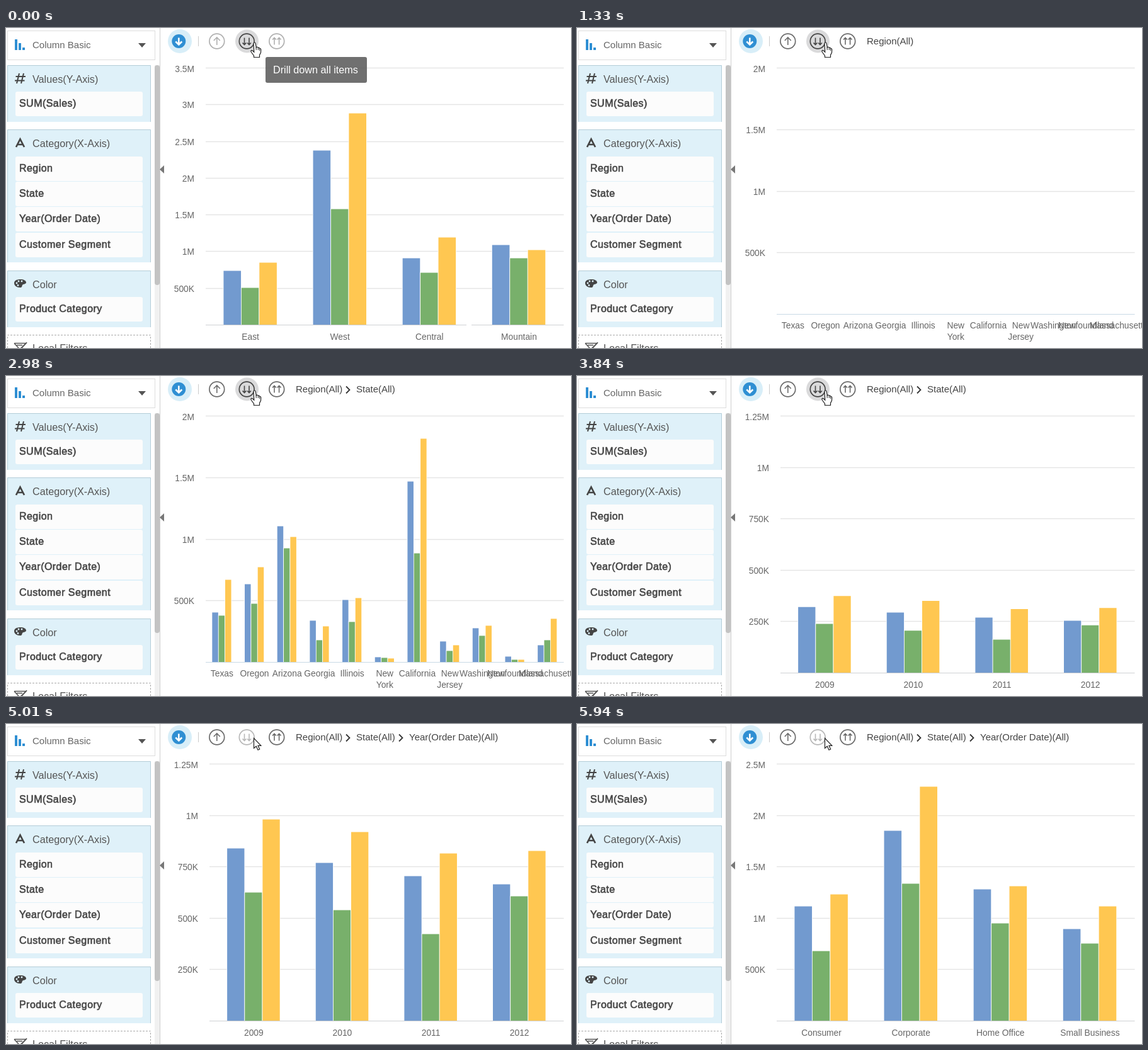
These frames come from a looping animation (897 px wide and 508 px high, 6.41 s). An HTML page with a canvas:

```html
<!DOCTYPE html>
<html lang="en">
<head>
<meta charset="utf-8">
<title>Drill down chart</title>
<style>
html, body { margin: 0; width: 100%; height: 100%; overflow: hidden; background: #fff; }
canvas { display: block; }
</style>
</head>
<body>
<canvas id="stage" width="897" height="508"></canvas>
<script>
const ctx = document.getElementById('stage').getContext('2d');
const LOOP = 6410;
const GROW = 500;
const FONT = '"Liberation Sans", Arial, sans-serif';
const COLORS = ['#729acf', '#78b06b', '#ffc751'];

// Bar tops are in stage pixels, three per category.
const charts = [
  {
    at: 0, left: 317, base: 471, axis: '#cfd1d4',
    ticks: ['3.5M', '3M', '2.5M', '2M', '1.5M', '1M', '500K'],
    names: ['East', 'West', 'Central', 'Mountain'],
    tops: [385, 412, 372, 194, 287, 135, 365, 388, 332, 344, 365, 352]
  },
  {
    at: 1330, end: 1890, steps: 8, begin: 1330, left: 317, base: 454, axis: '#c9d9e6',
    ticks: ['2M', '1.5M', '1M', '500K'],
    names: ['Texas', 'Oregon', 'Arizona', 'Georgia', 'Illinois', 'New|York', 'California',
      'New|Jersey', 'Washington', 'Newfoundland', 'Massachusetts'],
    tops: [375, 380, 323, 330, 361, 303, 238, 273, 255, 388, 419, 397, 355, 390, 352,
      446, 447, 448, 167, 281, 99, 421, 436, 427, 400, 412, 396, 445, 450, 450, 427, 419, 385]
  },
  {
    at: 3680, end: 4150, steps: 7, begin: 3625, left: 323, base: 471, axis: '#cfd1d4',
    ticks: ['1.25M', '1M', '750K', '500K', '250K'],
    names: ['2009', '2010', '2011', '2012'],
    tops: [197, 267, 151, 220, 295, 171, 241, 333, 205, 254, 273, 201]
  },
  {
    at: 5390, end: 5940, steps: 8, begin: 5379, left: 317, base: 471, axis: '#cfd1d4',
    ticks: ['2.5M', '2M', '1.5M', '1M', '500K'],
    names: ['Consumer', 'Corporate', 'Home Office', 'Small Business'],
    tops: [289, 360, 270, 169, 253, 99, 262, 316, 257, 325, 348, 289]
  }
];

function text(str, x, y, size, color, align = 'left') {
  ctx.font = `${size}px ${FONT}`;
  ctx.fillStyle = color;
  ctx.textAlign = align;
  ctx.fillText(str, x, y);
}

// Medium weight: regular letters with a thin outline.
function mediumText(str, x, y) {
  ctx.letterSpacing = '0.45px';
  text(str, x, y, 16, '#444');
  ctx.strokeStyle = '#444';
  ctx.lineWidth = 0.6;
  ctx.strokeText(str, x, y);
  ctx.letterSpacing = '0px';
}

function rect(x, y, w, h, color, r = 0) {
  ctx.fillStyle = color;
  ctx.beginPath();
  ctx.roundRect(x, y, w, h, r);
  ctx.fill();
}

function disc(x, y, r, color) {
  ctx.fillStyle = color;
  ctx.beginPath();
  ctx.arc(x, y, r, 0, Math.PI * 2);
  ctx.fill();
}

function stroke(path, color, width = 1) {
  ctx.strokeStyle = color;
  ctx.lineWidth = width;
  ctx.stroke(new Path2D(path));
}

function fill(path, color) {
  ctx.fillStyle = color;
  ctx.fill(new Path2D(path), 'evenodd');
}

// Holds the time at the start of the current step.
function hold(t, start, end, steps) {
  const d = (end - start) / (steps - 1);
  const k = Math.floor((t - start + 6) / d);
  return start + Math.max(0, Math.min(steps - 1, k)) * d;
}

function swing(p) {
  return 0.5 - Math.cos(Math.PI * Math.max(0, Math.min(1, p))) / 2;
}

function section(y, h, title, first, items) {
  rect(2, y, 228, h, '#dff1f9');
  stroke(`M2.5 ${y + h}V${y + 0.5}H229.5V${y + h}`, '#b3cdd8');
  text(title, 42, y + 28, 16.2, '#555');
  items.forEach((item, i) => {
    const top = Math.round(first + i * 40.2);
    rect(15, top, 202, 39, '#fcfcfc', 3);
    mediumText(item, 21, top + 24);
  });
}

function panel() {
  ctx.strokeStyle = '#dcdcdc';
  ctx.lineWidth = 1;
  ctx.strokeRect(2.5, 4.5, 234, 46);
  rect(14, 18, 4, 17, '#2f8fd3');
  rect(20, 24, 4, 11, '#2f8fd3');
  rect(26, 31, 4, 4, '#2f8fd3');
  text('Column Basic', 42, 32, 15, '#666');
  fill('M210 24H222L216 31Z', '#555');

  section(59, 90, 'Values(Y-Axis)', 101, ['SUM(Sales)']);
  section(161, 211, 'Category(X-Axis)', 204, ['Region', 'State', 'Year(Order Date)', 'Customer Segment']);
  section(385, 90, 'Color', 427, ['Product Category']);

  stroke('M21 72L17 88M28 72L24 88M15.5 77H31M14 83.5H29.5', '#444', 2);
  stroke('M16 189L22.5 176.5L29 189M18.5 185H26.5', '#444', 2.7);
  fill('M13 405C13 401 17 399 23 399C28 399 32 401 32 404C32 407 27 406 26 408C25 410 26 412 22 412C17 412 13 409 13 405Z', '#444');
  [[17, 405], [20, 402], [25, 402], [19, 408.5]].forEach(p => disc(p[0], p[1], 1.4, '#dff1f9'));

  ctx.setLineDash([3, 2]);
  stroke('M2.5 508V487.5H229.5V508', '#aaa');
  ctx.setLineDash([]);
  stroke('M13 500.5H32L25 508M13 500.5L20 508M17 503.5H26M33 499L23 509', '#555', 1.5);
  text('Local Filters', 42, 514, 16.2, '#555');

  stroke('M244.5 0V508', '#cfcfcf');
  rect(236, 59, 8, 449, '#f1f1f1');
  rect(236, 59, 8, 349, '#c3c3c3', 4);
  fill('M251 218V231L244 224.5Z', '#777');
}

function arrow(x, dir, len, head) {
  const tip = 21 + dir * len;
  const back = tip - dir * head;
  return `M${x} ${21 - dir * len}V${tip}M${x - head} ${back}L${x} ${tip}L${x + head} ${back}`;
}

function ring(x, arrows, color) {
  ctx.strokeStyle = color;
  ctx.lineWidth = 1.7;
  ctx.beginPath();
  ctx.arc(x, 21, 11.9, 0, Math.PI * 2);
  ctx.stroke();
  stroke(arrows, color, 1.6);
}

function toolbar(t) {
  disc(276, 21, 19, '#d8eef8');
  disc(274.3, 21, 11, '#2f8fd3');
  stroke(arrow(274.3, 1, 5.5, 5), '#fff', 2.6);
  stroke('M305.5 13V29', '#ccc');

  const side = t < 540 ? '#b0b0b0' : '#6b6b6b';
  if (t < 4850) {
    const pressed = (t >= 540 && t < 700) || (t >= 2740 && t < 2900);
    disc(382.5, 21, 18.5, t >= 4770 ? '#ebebeb' : pressed ? '#d2d2d3' : '#dadadb');
  }
  ring(334.8, arrow(334.8, -1, 6, 5), side);
  ring(382.2, arrow(378.5, 1, 5.5, 3) + arrow(386, 1, 5.5, 3), t < 5010 ? '#444' : '#b8b8b8');
  ring(429.8, arrow(426, -1, 5.5, 3) + arrow(433.6, -1, 5.5, 3), side);

  if (t >= 540) text('Region(All)', 460, 26, 15, '#444');
  if (t >= 2740) crumb('State(All)', 556);
  if (t >= 4770) crumb('Year(Order Date)(All)', 640);
}

function crumb(label, x) {
  stroke(`M${x - 16} 16.5L${x - 10.5} 22L${x - 16} 27.5`, '#333', 1.8);
  text(label, x, 26, 15, '#444');
}

function chart(c, t) {
  const right = 885.5;
  const gap = (c.base - 63) / c.ticks.length;
  c.ticks.forEach((label, i) => {
    const y = Math.round(63 + gap * i) + 0.5;
    stroke(`M${c.left} ${y}H${right}`, '#e5e5e5', 1.3);
    text(label, c.left - 18, y + (i ? 5.5 : 6.5), 13.8, '#666', 'right');
  });

  const p = c.end ? swing((hold(t, c.at, c.end, c.steps) - c.begin) / GROW) : 1;
  const step = (right - c.left) / c.names.length;
  const w = step * 0.2;
  c.names.forEach((name, i) => {
    const mid = c.left + step * (i + 0.5);
    COLORS.forEach((color, j) => {
      const x = mid + w * (j - 1.5);
      const h = (c.base - c.tops[i * 3 + j] - 0.4) * p;
      if (h < 0.3) return;
      rect(x - 0.8, c.base - h - 1, w + 0.8, h + 1, '#fff');
      rect(x, c.base - h, w - 0.8, h, color);
    });
    name.split('|').forEach((line, k) => {
      text(line, mid, c.base + (c.names.length > 4 ? 23 : 24) + k * 18, 13.8, '#666', 'center');
    });
  });
  stroke(`M${c.left} ${c.base + 0.5}H${right}`, c.axis, 1.2);
}

function tooltip(t) {
  const fade = t < 540 ? 1 : 0.75 - (hold(t, 540, 780, 4) - 540) / 320;
  if (fade <= 0) return;
  ctx.globalAlpha = fade;
  rect(412, 46, 161, 41, 'rgba(97,97,97,0.9)', 3);
  text('Drill down all items', 424, 72, 16.2, '#fff');
  ctx.globalAlpha = 1;
}

function cursor(t) {
  const hand = t < 4850;
  const shape = hand
    ? 'M393 24.5C393 22.5 396 22.5 396.2 24.5L397.2 31C398 29.8 400 30 400.3 31.5C401.4 30.7 402.6 31.4 402.7 32.6C404 32.2 404.8 33 404.7 34.5L404.5 39L402.5 43V46.5H393.5V44L389.5 38.5C387.8 36 389.8 34.5 391.5 36L393.8 38.2Z'
    : 'M393.5 22.5V38.5L397.2 35.2L400 41.2L402.7 40L400 34.3H404.8Z';
  fill(shape, '#fff');
  stroke(shape, '#222', 1.2);
  if (hand) stroke('M397.2 31V35M400.3 32V35M402.6 33V36', '#222', 1);
}

function draw(t) {
  rect(0, 0, 897, 508, '#fff');
  panel();
  chart(charts.filter(c => t >= c.at).pop(), t);
  if (t < 540) rect(731, 470.5, 8, 2.5, '#fff');
  toolbar(t);
  tooltip(t);
  cursor(t);
}

function tick() {
  draw(performance.now() % LOOP);
  requestAnimationFrame(tick);
}
tick();
</script>
</body>
</html>
```
